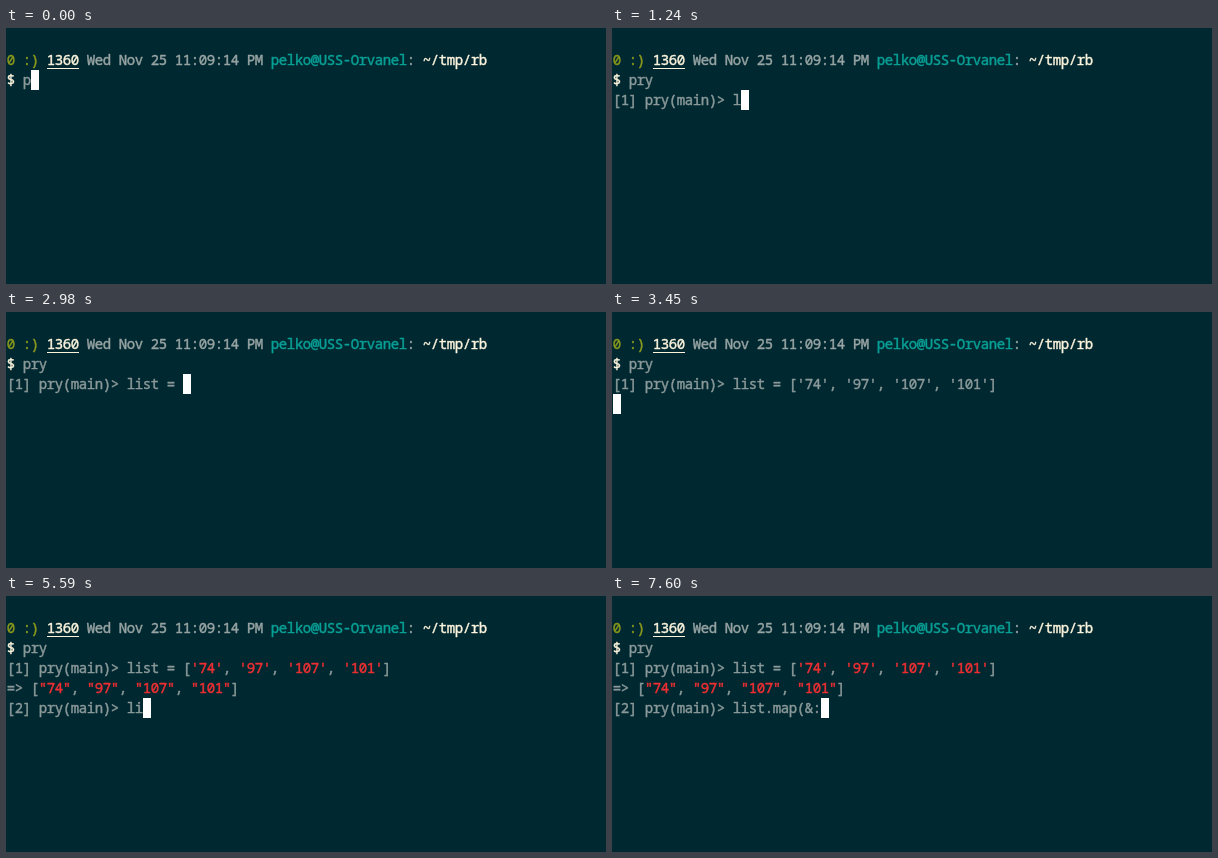
Write an HTML page with a canvas that moves like this. It is 600 px wide and 256 px high and loops after 8000 ms.

```html
<!DOCTYPE html>
<html lang="en">
<head>
<meta charset="utf-8">
<title>Terminal session</title>
<style>
html, body { margin: 0; width: 600px; height: 256px; overflow: hidden; background: #002831; }
canvas { display: block; }
</style>
</head>
<body>
<canvas id="screen" width="600" height="256"></canvas>
<script>
const ctx = document.getElementById('screen').getContext('2d');
const LOOP = 8000, CELL = 8, LINE = 20, LEFT = 1, TOP = 22, BASELINE = 15;
const color = {
  back: '#002831', text: '#8b9999', date: '#98a4a3', bright: '#fcf4dc',
  green: '#8a9a1c', cyan: '#08a096', red: '#ee2f32', cursor: '#ffffff'
};

const LIST = "['74', '97', '107', '101']";
const ENTERED = '[1] pry(main)> list = ' + LIST;
const RESULT = '=> ' + LIST.replace(/'/g, '"');

// Each entry: time, cursor row, text on that row.
const steps = [[0, 1, '$ p'], [460, 1, '$ pr'], [560, 1, '$ pry'], [670, 2, '']];

function type(row, start, keys) {
  let line = start;
  for (const [time, key] of keys) steps.push([time, row, line += key]);
}

type(2, '[1] pry(main)> ', [
  [1140, ''], [1240, 'l'], [1970, 'i'], [2050, 's'], [2140, 't'], [2230, ' '],
  [2690, '='], [2980, ' '], [3080, '['], [3350, "'"]
]);
steps.push([3450, 3, ''], [4010, 4, '']);
type(4, '[2] pry(main)> ', [
  [4080, ''], [4160, 'l'], [5590, 'i'], [5660, 's'], [5750, 't'], [5840, '.'],
  [6090, 'm'], [6310, 'a'], [6400, 'p'], [6490, '('], [7110, '&'], [7600, ':']
]);

// A hairline outline gives the glyphs a medium weight.
function write(row, col, text, fill) {
  ctx.font = '14px "Noto Sans Mono", "DejaVu Sans Mono", monospace';
  ctx.textAlign = 'center';
  ctx.lineWidth = 0.45;
  ctx.lineJoin = 'round';
  ctx.fillStyle = ctx.strokeStyle = fill;
  [...text].forEach((glyph, i) => {
    const x = LEFT + (col + i + 0.5) * CELL, y = TOP + row * LINE + BASELINE;
    ctx.fillText(glyph, x, y);
    ctx.strokeText(glyph, x, y);
  });
}

function writeParts(row, parts) {
  let col = 0;
  for (const [text, fill] of parts) {
    write(row, col, text, fill);
    col += text.length;
  }
}

function writeCode(row, text) {
  const parts = text.split(/('\d+'|"\d+")/);
  writeParts(row, parts.map(part => [part, /^['"]\d/.test(part) ? color.red : color.text]));
}

function writeHeader() {
  writeParts(0, [
    ['0 :) ', color.green], ['1360', color.bright], [' Wed Nov 25 11:09:14 PM ', color.date],
    ['pelko@USS-Orvanel', color.cyan], [': ', color.date], ['~/tmp/rb', color.bright]
  ]);
  ctx.fillRect(LEFT + 5 * CELL, 40, 4 * CELL, 1);
}

function draw(time) {
  ctx.fillStyle = color.back;
  ctx.fillRect(0, 0, 600, 256);
  writeHeader();

  const [, row, line] = steps.filter(step => step[0] <= time).pop();
  const command = row === 1 ? line : '$ pry';
  writeParts(1, [['$', color.bright], [command.slice(1), color.text]]);

  if (row === 2) write(2, 0, line, color.text);
  if (row > 2) {
    if (time < 3940) write(2, 0, ENTERED, color.text);
    else writeCode(2, ENTERED);
  }
  if (row > 3) {
    writeCode(3, RESULT);
    write(4, 0, line, color.text);
  }

  ctx.fillStyle = color.cursor;
  ctx.fillRect(LEFT + line.length * CELL, TOP + row * LINE, CELL, LINE);
}

function frame() {
  draw(performance.now() % LOOP);
  requestAnimationFrame(frame);
}
frame();
</script>
</body>
</html>
```
